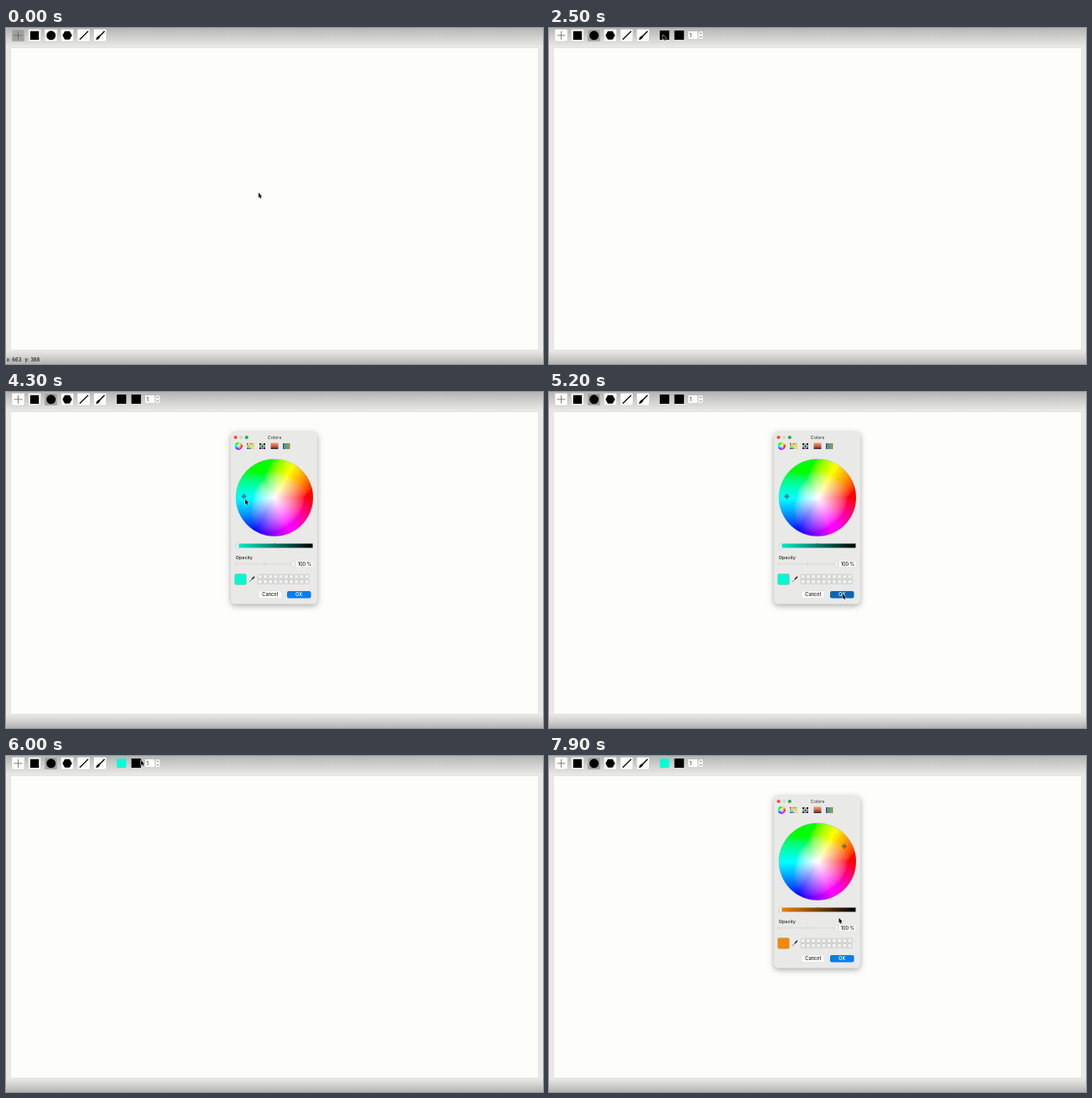
Animation of 640x400 px, one loop 8 s. Source, as an HTML page with a canvas:

```html
<!DOCTYPE html>
<html lang="en">
<head>
<meta charset="utf-8">
<title>Drawing app</title>
<style>
html, body { margin: 0; width: 100%; height: 100%; overflow: hidden; }
canvas { display: block; }
</style>
</head>
<body>
<canvas id="stage" width="640" height="400"></canvas>
<script>
const c = document.getElementById('stage').getContext('2d');
const LOOP = 8000, STEP = 100;
const FIELD = '#fdfdfb', PANEL = '#e9e9e7', EDGE = '#c9c9c7';
const CENTER = { x: 320, y: 125.7 }, RADIUS = 46;

const smooth = u => u * u * (3 - 2 * u);
const easeOut = u => 1 - (1 - u) ** 3;

// Pointer moves between the controls, at rest in between
const home = { x: 301, y: 196 };
const moves = [
  { from: 250, to: 1450, x: 50, y: 6 },
  { from: 1650, to: 2150, x: 110, y: 30 },
  { from: 2150, to: 2550, x: 137, y: 7 },
  { from: 2680, to: 4000, x: 283, y: 124, ease: easeOut },
  { from: 4200, to: 5150, x: 350, y: 240 },
  { from: 5200, to: 6000, x: 161, y: 5 },
  { from: 6000, to: 6200, x: 157, y: 7 },
  { from: 6200, to: 7270, x: 352, y: 107 },
  { from: 7380, to: 8250, x: 342, y: 240 }
];

function pointerAt(t) {
  let { x, y } = home;
  for (const m of moves) {
    if (t <= m.from) break;
    const k = (m.ease || smooth)(Math.min(1, (t - m.from) / (m.to - m.from)));
    x += (m.x - x) * k;
    y += (m.y - y) * k;
  }
  return { x, y };
}

function box(x, y, w, h, fill, r = 0, stroke) {
  c.beginPath();
  c.roundRect(x, y, w, h, r);
  if (fill) { c.fillStyle = fill; c.fill(); }
  if (stroke) { c.strokeStyle = stroke; c.lineWidth = .6; c.stroke(); }
}

function circle(x, y, r, fill, stroke, width = .6) {
  c.beginPath();
  c.arc(x, y, r, 0, Math.PI * 2);
  if (fill) { c.fillStyle = fill; c.fill(); }
  if (stroke) { c.strokeStyle = stroke; c.lineWidth = width; c.stroke(); }
}

function trace(points) {
  c.beginPath();
  for (let i = 0; i < points.length; i += 2) c.lineTo(points[i], points[i + 1]);
}

function line(width, color, ...points) {
  trace(points);
  c.lineWidth = width;
  c.strokeStyle = color;
  c.stroke();
}

function cross(x, y, r, color) {
  line(.7, color, x - r, y, x + r, y);
  line(.7, color, x, y - r, x, y + r);
}

function text(s, x, y, size = 5.6, color = '#222', align = 'left') {
  c.font = `500 ${size}px Inter, sans-serif`;
  c.textAlign = align;
  c.fillStyle = color;
  c.fillText(s, x, y);
}

function gradient(x0, y0, x1, y1, ...colors) {
  const g = c.createLinearGradient(x0, y0, x1, y1);
  colors.forEach((color, i) => g.addColorStop(i / (colors.length - 1), color));
  return g;
}

// Hue and saturation disc in Display P3, clipped to sRGB
function makeWheel(size) {
  const canvas = document.createElement('canvas');
  canvas.width = canvas.height = size;
  const ctx = canvas.getContext('2d');
  const image = ctx.createImageData(size, size);
  const linear = v => v <= .04045 ? v / 12.92 : ((v + .055) / 1.055) ** 2.4;
  const encode = v => 255 * (v <= .0031308 ? 12.92 * v : 1.055 * v ** (1 / 2.4) - .055);
  for (let i = 0; i < size * size; i++) {
    const dx = (i % size + .5) * 2 / size - 1;
    const dy = 1 - (Math.floor(i / size) + .5) * 2 / size;
    const sat = Math.min(1, Math.hypot(dx, dy));
    const hue = Math.atan2(dy, dx) * 3 / Math.PI + 6;
    const [r, g, b] = [5, 3, 1].map(n => {
      const k = (n + hue) % 6;
      return linear(1 - sat * Math.max(0, Math.min(k, 4 - k, 1)));
    });
    image.data.set([
      encode(1.2249 * r - .2249 * g),
      encode(1.042 * g - .042 * r),
      encode(1.0983 * b - .0196 * r - .0786 * g),
      255
    ], i * 4);
  }
  ctx.putImageData(image, 0, 0);
  return canvas;
}
const wheelImage = makeWheel(RADIUS * 4);

function wheel(x, y, r) {
  c.save();
  circle(x, y, r);
  c.clip();
  c.imageSmoothingQuality = 'high';
  c.drawImage(wheelImage, x - r, y - r, r * 2, r * 2);
  c.restore();
}

function windowFrame() {
  box(0, 0, 640, 400, '#e8e8e6');
  box(0, 0, 640, 22, gradient(0, 0, 0, 22, '#b4b4b4', '#d0d0ce', '#e8e8e6'));
  box(0, 384, 640, 16, gradient(0, 384, 0, 400, '#e8e8e6', '#d0d0ce', '#b2b2b2'));
  box(5.5, 23.5, 629, 360, FIELD, 0, '#dcdcda');
}

function toolbar(selected, fill) {
  for (let i = 0; i < 6; i++) {
    box(7 + i * 19.5, 1.5, 15, 14.5, i === selected ? '#a0a09e' : FIELD, 1, EDGE);
  }
  cross(14.5, 8.8, 5, '#555');
  box(28.8, 3.7, 10.4, 10.4, '#000');
  circle(53.7, 8.8, 5.5, '#000');
  const hexagon = [];
  for (let a = 0; a < 6; a++) {
    hexagon.push(73 + 5.7 * Math.cos(a * Math.PI / 3), 8.8 + 5.7 * Math.sin(a * Math.PI / 3));
  }
  trace(hexagon);
  c.fill();
  line(1.2, '#000', 87.8, 13.8, 98, 3.8);
  line(1.4, '#000', 107.5, 13.8, 117.5, 3.8);
  line(2.6, '#000', 108.5, 12.8, 111.5, 9.8);
  if (selected !== 2) return;
  box(132, 3, 11.3, 11, fill);
  box(149.5, 3, 11.3, 11, '#000');
  box(166, 4, 11, 9, FIELD);
  text('1', 167.5, 10.7);
  box(178.3, 4, 5, 9, FIELD, 2);
  for (const d of [-1, 1]) line(.7, '#555', 179.6, 8.5 + d * 1.3, 180.8, 8.5 + d * 2.8, 182, 8.5 + d * 1.3);
}

function tabs() {
  wheel(277.2, 64.3, 4.6);
  for (let i = 0; i < 3; i++) {
    box(287, 60.8 + i * 2.7, 9, 1.8, gradient(287, 0, 296, 0, `hsl(${i * 110} 70% 50%)`, '#e8d84a'));
    box(289 + i * 2, 60.5 + i * 2.7, 1.2, 2.4, '#fff');
  }
  for (let i = 0; i < 9; i++) {
    box(302 + i % 3 * 2.5, 61 + Math.floor(i / 3) * 2.5, 2, 2, i % 2 ? `hsl(${i * 40} 50% 50%)` : '#222');
  }
  box(315.5, 60.5, 9, 7.5, gradient(0, 60, 0, 68, '#f0a368', '#db6548', '#332b45'), .5);
  for (let i = 0; i < 5; i++) box(330 + i * 1.7, 61, 1.5, 7, `hsl(${240 - i * 50} 45% 40%)`);
}

function dialog(color, mark, pressed) {
  c.save();
  c.shadowColor = '#0005';
  c.shadowBlur = 7;
  c.shadowOffsetY = 2;
  box(268, 47.5, 103, 205, PANEL, 5);
  c.restore();
  ['#f94c3e', '#d4d4d2', '#23ad3c'].forEach((light, i) => circle(273.6 + i * 6.6, 54, 2.1, light));
  text('Colors', CENTER.x, 56, 5.3, '#444', 'center');
  tabs();

  wheel(CENTER.x, CENTER.y, RADIUS);
  circle(CENTER.x, CENTER.y, RADIUS, null, '#8886');
  circle(mark.x, mark.y, 2, null, '#555', .7);
  cross(mark.x, mark.y, 3, '#555');

  box(274, 180.5, 91.5, 5, gradient(274, 0, 365.5, 0, color, '#000'));
  line(.7, '#555', 320, 179.8, 320, 181.5);
  box(274.3, 179.3, 3, 7.5, FIELD, 1.3, EDGE);

  text('Opacity', 273.8, 199, 5.4);
  line(.6, EDGE, 274, 204.8, 342, 204.8);
  for (let x = 274; x < 343; x += 34) line(.6, EDGE, x, 202.5, x, 207);
  box(341, 201.3, 2.8, 7, FIELD, 1.3, EDGE);
  box(346, 201.3, 19.3, 6.8, FIELD);
  text('100 %', 364, 206.8, 5.5, '#222', 'right');

  box(272.5, 216.5, 14, 13, color, 2, '#b8b8b6');
  line(.9, '#777', 290, 226.2, 294, 222);
  line(1.7, '#333', 293, 223, 296, 219.8);
  for (let i = 0; i < 20; i++) {
    box(300.2 + i % 10 * 6.2, 217.3 + Math.floor(i / 10) * 6, 5.2, 5, '#f0f0ee', .5, '#b5b5b3');
  }
  box(301, 237, 27.5, 8.5, FIELD, 2, '#ddd');
  text('Cancel', 314.7, 243.2, 5.7, '#222', 'center');
  box(335, 237, 28.5, 8.5, pressed ? '#0b65b0' : '#0a7cef', 2);
  text('OK', 349.2, 243.2, 5.7, '#fff', 'center');
}

function pointer({ x, y }) {
  c.save();
  c.translate(x, y);
  c.lineJoin = 'round';
  trace([0, 0, 0, 6, 1.3, 4.9, 2.1, 7, 3.2, 6.5, 2.4, 4.5, 4.1, 4.4]);
  c.closePath();
  c.lineWidth = 1;
  c.strokeStyle = '#fffc';
  c.stroke();
  c.fillStyle = '#000';
  c.fill();
  c.restore();
}

function draw(t) {
  const tip = pointerAt(t);
  const confirmed = t >= 5300;
  const open = confirmed ? t >= 6300 : t >= 2700;
  windowFrame();
  toolbar(t >= 1500 ? 2 : 0, confirmed ? '#00ffd5' : '#000');
  if (open) {
    if (t >= 7300) dialog('#f68800', { x: 352, y: 107.5 });
    else if (t >= 4000 && !confirmed) dialog('#00f8d2', { x: 283.5, y: 124.3 }, t >= 5200);
    else dialog(FIELD, CENTER);
  } else if (tip.y > 23) {
    text('x: ' + Math.round(tip.x * 2.2026), .8, 396.5, 5.8, '#111');
    text('y: ' + Math.round((tip.y - 20) * 2.2045), 22.5, 396.5, 5.8, '#111');
  }
  pointer(tip);
}

function tick() {
  draw(Math.floor(performance.now() % LOOP / STEP) * STEP);
  requestAnimationFrame(tick);
}
tick();
</script>
</body>
</html>
```
